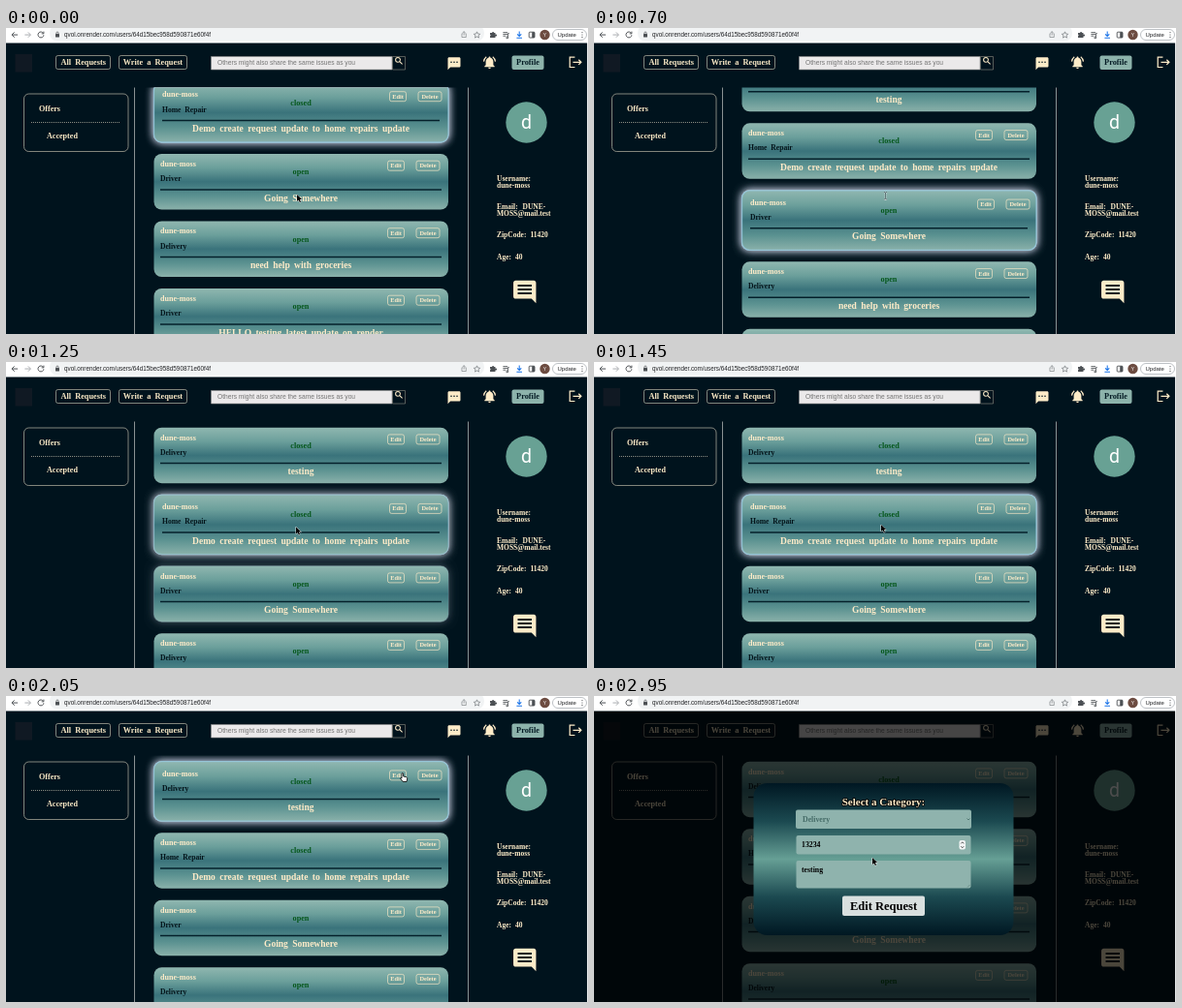
Recreate the animation shown at these times as an HTML page with a canvas. Size 600 by 316 pixels, loop 3 s.

```html
<!DOCTYPE html>
<html lang="en">
<head>
<meta charset="utf-8">
<title>Requests</title>
<style>
html, body { margin: 0; width: 100%; height: 100%; overflow: hidden; background: #00131d; }
canvas { display: block; width: 600px; height: 316px; }
</style>
</head>
<body>
<canvas id="stage"></canvas>
<script>
const W = 600, H = 316, LOOP = 3000, STEP = 50;
const SERIF = '"Liberation Serif", serif', SANS = '"Liberation Sans", sans-serif';
const CREAM = '#fdebc8', DARK = '#00131d', RIM = '#c9c3b0', USER = 'dune-moss';
const MODAL_AT = 2350;

const canvas = document.getElementById('stage');
const ctx = canvas.getContext('2d');
const dpr = window.devicePixelRatio || 1;
canvas.width = W * dpr;
canvas.height = H * dpr;

const cards = [
  { kind: 'Delivery', status: 'closed', title: 'testing' },
  { kind: 'Home Repair', status: 'closed', title: 'Demo create request update to home repairs update' },
  { kind: 'Driver', status: 'open', title: 'Going Somewhere' },
  { kind: 'Delivery', status: 'open', title: 'need help with groceries' },
  { kind: 'Driver', status: 'open', title: 'HELLO testing latest update on render' }
];

// Which card the pointer is over, from which time on
const hovers = [[-1000, 1], [50, 2], [1050, 1], [1800, 0], [MODAL_AT, -1]];

// Pointer stops: time, x, y
const path = [
  [0, 300, 172], [200, 301, 174], [400, 301, 174], [700, 300.5, 173], [950, 301, 172], [1100, 301, 172],
  [1450, 296, 168], [1650, 312, 152], [2000, 408, 80], [2400, 408, 80], [2850, 287, 167], [3000, 287, 167]
];

const clamp = v => Math.max(0, Math.min(1, v));
const smooth = v => { v = clamp(v); return v * v * (3 - 2 * v); };

const icons = {
  sms: new Path2D('M20 2H4c-1.1 0-2 .9-2 2v18l4-4h14c1.1 0 2-.9 2-2V4c0-1.1-.9-2-2-2z'),
  note: new Path2D('M22 4c0-1.1-.9-2-2-2H4c-1.1 0-2 .9-2 2v12c0 1.1.9 2 2 2h14l4 4V4z'),
  bell: new Path2D('M12 22c1.1 0 2-.9 2-2h-4c0 1.1.9 2 2 2zm6-6v-5c0-3.1-1.6-5.6-4.5-6.3V4c0-.8-.7-1.5-1.5-1.5s-1.5.7-1.5 1.5v.7C7.6 5.4 6 7.9 6 11v5l-2 2v1h16v-1z'),
  waves: new Path2D('M7 3C4.5 5 3 7.5 2.8 10.5M17 3c2.5 2 4 4.5 4.2 7.5'),
  exit: new Path2D('M13 4H5v16h8M10 12h13M19 8l4 4-4 4'),
  lens: new Path2D('M15.5 9.5a6 6 0 1 1-12 0a6 6 0 1 1 12 0M14 14l7 7'),
  back: new Path2D('M20 12H5M11 5l-7 7 7 7'),
  reload: new Path2D('M19 8a8 8 0 1 0 1 5M20 3v6h-6'),
  share: new Path2D('M8 9H5v12h14V9h-3M12 15V2M8 6l4-4 4 4'),
  star: new Path2D('M12 3l2.7 6 6.3.6-4.8 4.3 1.4 6.4L12 17l-5.6 3.3 1.4-6.4L3 9.6 9.3 9z'),
  puzzle: new Path2D('M3 7h6a3 3 0 1 1 6 0h4v5a3 3 0 1 1 0 5v5H3v-5a3 3 0 0 0 0-5z'),
  list: new Path2D('M3 5h13M3 10h13M3 15h8M17 19V8h4M17 18a2.5 2.5 0 1 1-.1-.1'),
  load: new Path2D('M12 2v13M6 10l6 6 6-6M4 21h16'),
  arrow: new Path2D('M0 0V8.3L2 6.5 3.3 9.5 4.7 8.9 3.4 6H6z'),
  beam: new Path2D('M-1.6-3.6Q0-3.6 0-2.4Q0-3.6 1.6-3.6M0-2.4V2.8M-1.6 4Q0 4 0 2.8Q0 4 1.6 4'),
  hand: new Path2D('M0 0Q1-1 1.6 0V3L5 3.8Q6 4.2 5.6 6L5 8.5H1.2L-1.6 5Q-1.2 4 0 5z')
};

function rect(x, y, w, h, r, fill, stroke, lw = 0.65) {
  ctx.beginPath();
  ctx.roundRect(x, y, w, h, r);
  if (fill) { ctx.fillStyle = fill; ctx.fill(); }
  if (stroke) { ctx.strokeStyle = stroke; ctx.lineWidth = lw; ctx.stroke(); }
}

function disc(x, y, r, fill) {
  ctx.beginPath();
  ctx.arc(x, y, r, 0, 7);
  ctx.fillStyle = fill;
  ctx.fill();
}

function line(x1, y1, x2, y2, color, lw = 1, dash = []) {
  ctx.beginPath();
  ctx.setLineDash(dash);
  ctx.moveTo(x1, y1);
  ctx.lineTo(x2, y2);
  ctx.strokeStyle = color;
  ctx.lineWidth = lw;
  ctx.stroke();
  ctx.setLineDash([]);
}

// y is the visual middle of the letters
function text(str, x, y, size, color, align = 'left', font = 'bold ' + size + 'px ' + SERIF, gap = 2) {
  ctx.font = font;
  ctx.textAlign = align;
  ctx.wordSpacing = gap + 'px';
  ctx.fillStyle = color;
  ctx.fillText(str, x, y + size * 0.32);
}

const sans = (str, x, y, size, color, align) =>
  text(str, x, y, size, color, align, size + 'px ' + SANS, 0);

function icon(name, x, y, scale, fill, stroke, lw = 2) {
  ctx.save();
  ctx.translate(x, y);
  ctx.scale(scale, Math.abs(scale));
  if (fill) { ctx.fillStyle = fill; ctx.fill(icons[name]); }
  if (stroke) { ctx.strokeStyle = stroke; ctx.lineWidth = lw; ctx.stroke(icons[name]); }
  ctx.restore();
}

function fade(y1, y2, ...stops) {
  const g = ctx.createLinearGradient(0, y1, 0, y2);
  stops.forEach((c, i) => g.addColorStop(i / (stops.length - 1), c));
  return g;
}

function browserBar() {
  ctx.fillStyle = '#fff';
  ctx.fillRect(0, 0, W, 15.5);
  rect(45, -3, 448, 16.5, 8, '#f1f3f4');
  const ink = '#4c5054';
  icon('back', 4.5, 2.5, 0.38, null, ink, 2.6);
  icon('back', 27, 2.5, -0.38, null, '#a9acb0', 2.6);
  icon('reload', 31.5, 2.5, 0.37, null, ink, 2.6);
  rect(51, 6, 4, 3.6, 0.6, ink);
  rect(51.9, 4, 2.2, 3.6, 1.1, null, ink, 0.7);
  sans('qvol.onrender.com/users/64d15bec958d590871e60f4f', 60, 7, 6.3, '#202124');
  icon('share', 468.4, 3, 0.31, null, '#74787c');
  icon('star', 481.2, 2.8, 0.36, null, '#74787c');
  icon('puzzle', 498, 2.6, 0.34, ink);
  icon('list', 511.3, 2.8, 0.36, null, ink, 2.4);
  icon('load', 525, 2.8, 0.35, null, '#1a73e8', 3);
  rect(539.2, 4.2, 5.8, 5.8, 0.8, null, ink, 0.9);
  rect(542.2, 4.2, 2.8, 5.8, 0, ink);
  disc(555.5, 7, 5.2, '#6d4c41');
  sans('Y', 555.5, 7.2, 5, '#fff', 'center');
  rect(563.5, 1.5, 35, 11, 5.5, '#fff', '#9aa0a6');
  sans('Update', 568.5, 7, 6, '#202124');
  for (const y of [4.6, 7, 9.4]) disc(594, y, 0.6, ink);
}

function header() {
  rect(9.5, 27, 17.5, 18.5, 0, '#101923');
  rect(51.5, 28.5, 56, 14, 2, null, RIM);
  text('All Requests', 79.7, 35.5, 8.3, CREAM, 'center');
  rect(116.5, 28.5, 70, 14, 2, null, RIM);
  text('Write a Request', 151.4, 35.5, 8.3, CREAM, 'center');
  rect(211.5, 29.5, 186.5, 13.5, 0, '#ebe9ea', '#8b8b8b');
  sans('Others might also share the same issues as you', 218, 36.3, 6.67, '#757575');
  rect(398.5, 29.5, 13, 13.5, 0, DARK, '#86847b');
  icon('lens', 400.2, 29, 0.4, null, CREAM, 2.6);
  icon('sms', 454.2, 28.9, 0.65, CREAM);
  for (const x of [459, 462, 465]) disc(x, 35.3, 0.8, DARK);
  icon('bell', 490.7, 27.8, 0.65, CREAM);
  icon('waves', 490.7, 27.8, 0.65, null, CREAM, 1.8);
  rect(521.5, 28.5, 33, 14.5, 2, '#8db3ab');
  text('Profile', 538, 35.5, 8.3, '#041b24', 'center');
  icon('exit', 578, 27.5, 0.65, null, CREAM, 1.9);
}

function panels() {
  line(132.5, 61.5, 132.5, H, '#aeb3b1', 0.8);
  line(476.5, 61.5, 476.5, H, '#aeb3b1', 0.8);
  rect(18.5, 68, 107.5, 59.5, 5, null, RIM);
  text('Offers', 34, 83.3, 8.1, CREAM);
  line(26, 97.5, 118, 97.5, RIM, 0.7, [1, 1]);
  text('Accepted', 42, 111.4, 8.1, CREAM);

  disc(536.5, 97.5, 21.2, '#68a194');
  text('d', 536.5, 97.8, 19.5, '#fff', 'center', '19.5px Roboto, sans-serif');
  const info = [
    ['Username:', 506, 155.4], [USER, 506, 162.5], ['Email:', 506, 184.6], ['DUNE-', 532.5, 184.6],
    ['MOSS@mail.test', 506, 192], ['ZipCode:', 506, 214], ['11420', 540.5, 214], ['Age:', 506, 236.5], ['40', 525, 236.5]
  ];
  for (const [s, x, y] of info) text(s, x, y, 7.5, CREAM);
  icon('note', 520.7, 258.5, 1.17, CREAM);
  for (const y of [266, 270, 274]) line(527.5, y, 542, y, DARK, 1.9);
}

function button(label, cx, cy, w) {
  rect(cx - w / 2, cy - 5, w, 10, 2, null, CREAM);
  text(label, cx, cy, 6.4, CREAM, 'center');
}

function card(c, top, over, glow, blue) {
  const h = over ? 61.5 : 57.5, p = over ? 2 : 0, y = top + p;
  if (glow > 0) {
    ctx.save();
    ctx.globalAlpha = glow * 0.8;
    ctx.shadowColor = `rgb(${222 - 15 * blue}, ${220 - 5 * blue}, ${226 + 8 * blue})`;
    ctx.shadowBlur = 9 * dpr;
    for (let i = 0; i < 2; i++) rect(152, top - 0.5, 304.5, h + 1, 8.5, '#b9c4c8');
    ctx.restore();
  }
  rect(152.5, top, 303.5, h, 8, fade(top, top + h, '#90b7b0', '#6b9f9b', '#3a737b', '#5a9190', '#8ab1aa'));
  if (glow > 0) {
    ctx.globalAlpha = glow * (0.25 + 0.6 * blue);
    rect(152.5, top, 303.5, h, 8, null, '#92c6dc', 1.3);
    ctx.globalAlpha = 1;
  }
  text(USER, 159 + p, y + 10.4, 8.1, CREAM);
  text(c.status, 304, y + 18.4, 8.2, '#06581c', 'center');
  text(c.kind, 159 + p, y + 25.7, 7.6, '#04141a');
  button('Edit', 402 + p, y + 12.2, 17);
  button('Delete', 435 + p, y + 12.2, 24);
  line(159 + p, y + 36.9, 449 - p, y + 36.9, '#04202b', 1.5);
  text(c.title, 304, y + 45.6, 9.5, CREAM, 'center');
}

function feed(t) {
  const now = hovers.findLastIndex(h => t >= h[0]);
  const over = hovers[now][1];
  const lit = clamp((t - hovers[now][0]) / 250);
  const last = now > 0 ? hovers[now - 1][1] : -1;
  const blue = 0.5 + 0.5 * Math.cos(t / 700 * 2 * Math.PI);
  let y = -13 + 80.7 * smooth((t - 390) / 605);

  ctx.save();
  ctx.beginPath();
  ctx.rect(133, 61.5, 343, H);
  ctx.clip();
  const tops = cards.map((c, i) => {
    const top = y;
    y += i === over ? 73.5 : 69.5;
    return top;
  });
  cards.forEach((c, i) => {
    const glow = i === over ? lit : i === last && t < MODAL_AT ? 1 - lit : 0;
    card(c, tops[i], i === over, glow, blue);
  });
  ctx.restore();
}

function modal() {
  ctx.fillStyle = 'rgba(0, 0, 0, .7)';
  ctx.fillRect(0, 15.5, 599, H);
  rect(164.5, 90, 268, 157, 14, fade(90, 247, '#001722', '#1b4950', '#669f95', '#1b4950', '#001722'));

  ctx.lineJoin = 'round';
  ctx.font = 'bold 11px ' + SERIF;
  ctx.textAlign = 'center';
  ctx.wordSpacing = '0px';
  ctx.strokeStyle = '#000';
  ctx.lineWidth = 1.6;
  ctx.strokeText('Select a Category:', 298.5, 113.3);
  text('Select a Category:', 298.5, 109.8, 11, CREAM, 'center', undefined, 0);

  const field = '#8fb3ad';
  rect(208, 117.5, 181, 19.5, 2, field);
  text('Delivery', 215, 127.5, 7.8, '#456b67');
  ctx.beginPath();
  ctx.moveTo(384.5, 126.5);
  ctx.lineTo(386, 128);
  ctx.lineTo(387.5, 126.5);
  ctx.strokeStyle = '#456b67';
  ctx.lineWidth = 0.8;
  ctx.stroke();

  rect(208.5, 144, 180, 19.5, 2, field);
  text('13234', 214, 153.8, 7.8, '#000');
  rect(376.5, 149, 6.5, 9.5, 2, '#f4f6f6');
  for (const d of [-1, 1]) {
    ctx.beginPath();
    ctx.moveTo(378.3, 153.8 + d * 1.4);
    ctx.lineTo(379.75, 153.8 + d * 3);
    ctx.lineTo(381.2, 153.8 + d * 1.4);
    ctx.strokeStyle = '#333';
    ctx.stroke();
  }

  rect(208.5, 170, 180, 28.5, 2, field);
  text('testing', 214, 180, 7.8, '#000');
  line(385, 197.5, 387.5, 195, '#557773', 0.6);

  rect(256, 206.5, 85, 20.5, 2, '#d9e0df');
  text('Edit Request', 298.5, 216.5, 12.5, '#000', 'center', undefined, 0);
}

function pointer(t) {
  const i = Math.max(1, path.findIndex(p => p[0] > t));
  const [t0, x0, y0] = path[i - 1], [t1, x1, y1] = path[i];
  const k = smooth((t - t0) / (t1 - t0));
  const x = x0 + (x1 - x0) * k, y = y0 + (y1 - y0) * k;
  if (t >= 150 && t < 950) {
    icon('beam', x, y, 1, null, '#dfe9e8', 1.5);
    icon('beam', x, y, 1, null, '#2c4448', 0.7);
  } else if (t >= 1950 && t < 2450) {
    icon('hand', x, y, 1, '#fff', '#000', 0.8);
  } else {
    icon('arrow', x, y, 0.85, '#000', '#fff', 1);
    icon('arrow', x, y, 0.85, '#000');
  }
}

function draw(t) {
  ctx.setTransform(dpr, 0, 0, dpr, 0, 0);
  ctx.fillStyle = DARK;
  ctx.fillRect(0, 0, W, H);
  header();
  panels();
  feed(t);
  if (t >= MODAL_AT) modal();
  ctx.fillStyle = '#e4e7e8';
  ctx.fillRect(599, 15, 1, H);
  browserBar();
  pointer(t);
}

const start = performance.now();
function tick() {
  const t = (performance.now() - start) % LOOP;
  draw(Math.floor(t / STEP) * STEP);
  requestAnimationFrame(tick);
}
tick();
</script>
</body>
</html>
```
